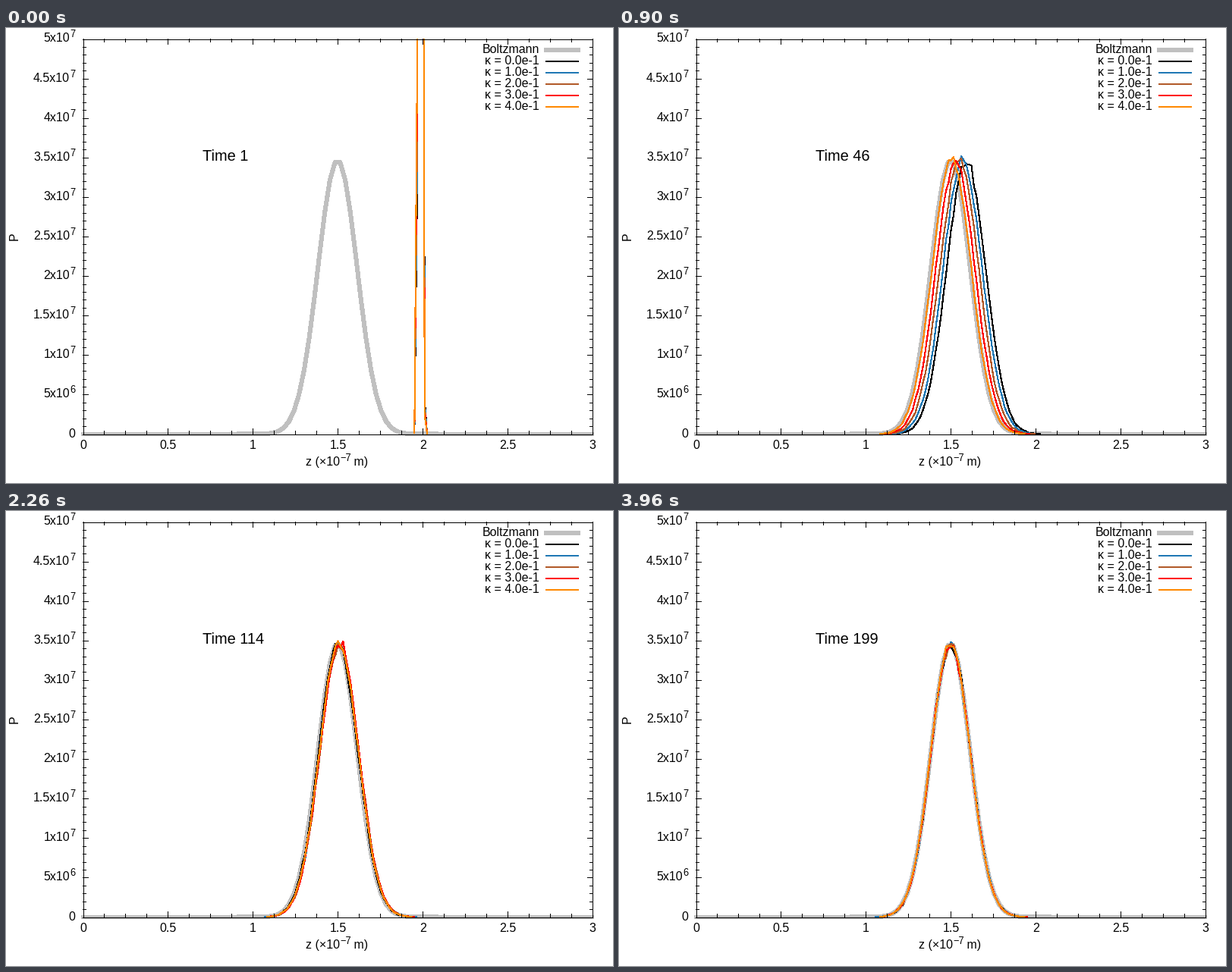
Recreate the animation shown at these times as a matplotlib script. Size 800x600 px, loop 3.98 s.

```python
import numpy as np
import matplotlib.pyplot as plt
from matplotlib.animation import FuncAnimation
from matplotlib.patches import Rectangle

W, H, DPI = 800, 600, 100
PX = 72 / DPI
LEFT, RIGHT, TOP, BOTTOM = 101, 772, 14, 535
FRAMES = 199
COLORS = ["black", "#1f78b4", "#b15928", "#ff0000", "#ff8800"]

plt.rcParams["font.family"] = "Liberation Sans"
plt.rcParams["text.hinting"] = "native"
fig = plt.figure(figsize=(W / DPI, H / DPI), dpi=DPI, facecolor="white")
ax = fig.add_axes([0, 0, 1, 1])
ax.set_xlim(0, W)
ax.set_ylim(H, 0)
ax.axis("off")


def sx(z):
    return LEFT + 0.5 + np.asarray(z) * (RIGHT - LEFT) / 3


def sy(p):
    return BOTTOM + 0.5 - np.asarray(p) * (BOTTOM - TOP) / 5e7


def line(x, y, color="black", width=1, **kw):
    kw.setdefault("solid_capstyle", "butt")
    return ax.plot(x, y, color=color, lw=width * PX, antialiased=False,
                   solid_joinstyle="round", **kw)[0]


def text(x, y, s, size=16, ha="left", **kw):
    kw.setdefault("va", "baseline")
    return ax.text(x, y, s, fontsize=size * PX, ha=ha, **kw)


def draw_ticks():
    for k in range(25):
        if k % 4 == 0:
            text(sx(k / 8) + 0.5, 555, f"{k / 8:g}", ha="center")
        size = 7 if k % 4 == 0 else 4
        x = sx(k / 8)
        line([x, x], [BOTTOM, BOTTOM - size], zorder=8)
        line([x, x], [TOP, TOP + size], zorder=8)
    for k in range(51):
        size = 7 if k % 5 == 0 else 4
        y = sy(k * 1e6)
        line([LEFT, LEFT + size], [y, y], zorder=8)
        line([RIGHT + 1, RIGHT + 1 - size], [y, y], zorder=8)
        if k % 5 == 0:
            draw_power(k, y + 4)


def draw_power(millions, y):
    if millions == 0:
        text(91, y, "0", ha="right")
        return
    exp = 7 if millions >= 10 else 6
    text(84, y, f"{millions / 10 ** (exp - 6):g}x10", ha="right")
    text(84, y - 6, str(exp), 12.8)


def draw_legend():
    names = ["Boltzmann"] + [f"κ = {k}.0e-1" for k in range(5)]
    for i, (name, color) in enumerate(zip(names, ["#c0c0c0"] + COLORS)):
        y = 29 + 14.9 * i
        text(703, y + 4, name, ha="right")
        if i == 0:
            line([709, 757], [y, y], color, 6)
        else:
            line([711, 755], [y, y], color, 2)


# Axes, labels and the equilibrium curve
line([LEFT + .5, RIGHT + .5, RIGHT + .5, LEFT + .5, LEFT + .5],
     [TOP + .5, TOP + .5, BOTTOM + .5, BOTTOM + .5, TOP + .5],
     zorder=8, solid_capstyle="projecting")
draw_ticks()
draw_legend()
text(395, 577, "z (×10")
text(440, 571, "−7", 12.8)
text(454.5, 577, " m)")
text(11, 275, "P", ha="center", va="center", rotation=90)
clock = text(259, 175, "", 20)

# Aliased curves fill every pixel they touch, so they are drawn a bit thin
SIGMA = 0.1155
z = np.linspace(0, 3, 100)
line(sx(z), sy(3.47e7 * np.exp(-0.5 * ((z - 1.5) / SIGMA) ** 2)),
     "#c0c0c0", 5, zorder=2, solid_capstyle="projecting")

clip = Rectangle((LEFT, TOP), RIGHT - LEFT, BOTTOM - TOP + 1,
                 transform=ax.transData)
curves = [line([], [], c, 1.1, zorder=3 + 0.1 * i)
          for i, c in enumerate(COLORS)]
for curve in curves:
    curve.set_clip_path(clip)

# Histogram of walkers released at z = 2 in a damped harmonic well
STEP = 0.015
WALKERS = 250000
MIN_COUNT = 12
bins = STEP * np.arange(200) + 0.003


def centre(t, k):
    omega = 0.156 + 0.0044 * k
    gamma = 0.0313 + 0.0007 * k
    lag = np.arctan(gamma / omega)
    swing = np.exp(-gamma * t) * np.cos(omega * t - lag) / np.cos(lag)
    return 1.5 + 0.4935 * swing * (1 + 0.3 * np.exp(-((t - 19) / 7) ** 2))


def spread(t):
    return np.hypot(SIGMA * (1 - np.exp(-(t / 10) ** 1.2)), STEP / 12 ** 0.5)


def update(i):
    t = i + 1
    rng = np.random.default_rng(t)
    s = spread(t)
    for k, curve in enumerate(curves):
        pdf = np.exp(-0.5 * ((bins - centre(t, k)) / s) ** 2)
        pdf /= s * np.sqrt(2 * np.pi)
        count = rng.poisson(WALKERS * STEP * pdf)
        used = np.flatnonzero(count >= MIN_COUNT)
        part = slice(used[0], used[-1] + 2)
        curve.set_data(sx(bins[part]),
                       sy(count[part] * 1e7 / (WALKERS * STEP)))
    clock.set_text(f"Time {t}")
    return [*curves, clock]


anim = FuncAnimation(fig, update, frames=FRAMES, interval=20,
                     repeat=True, repeat_delay=0, blit=False)
plt.show()
```
